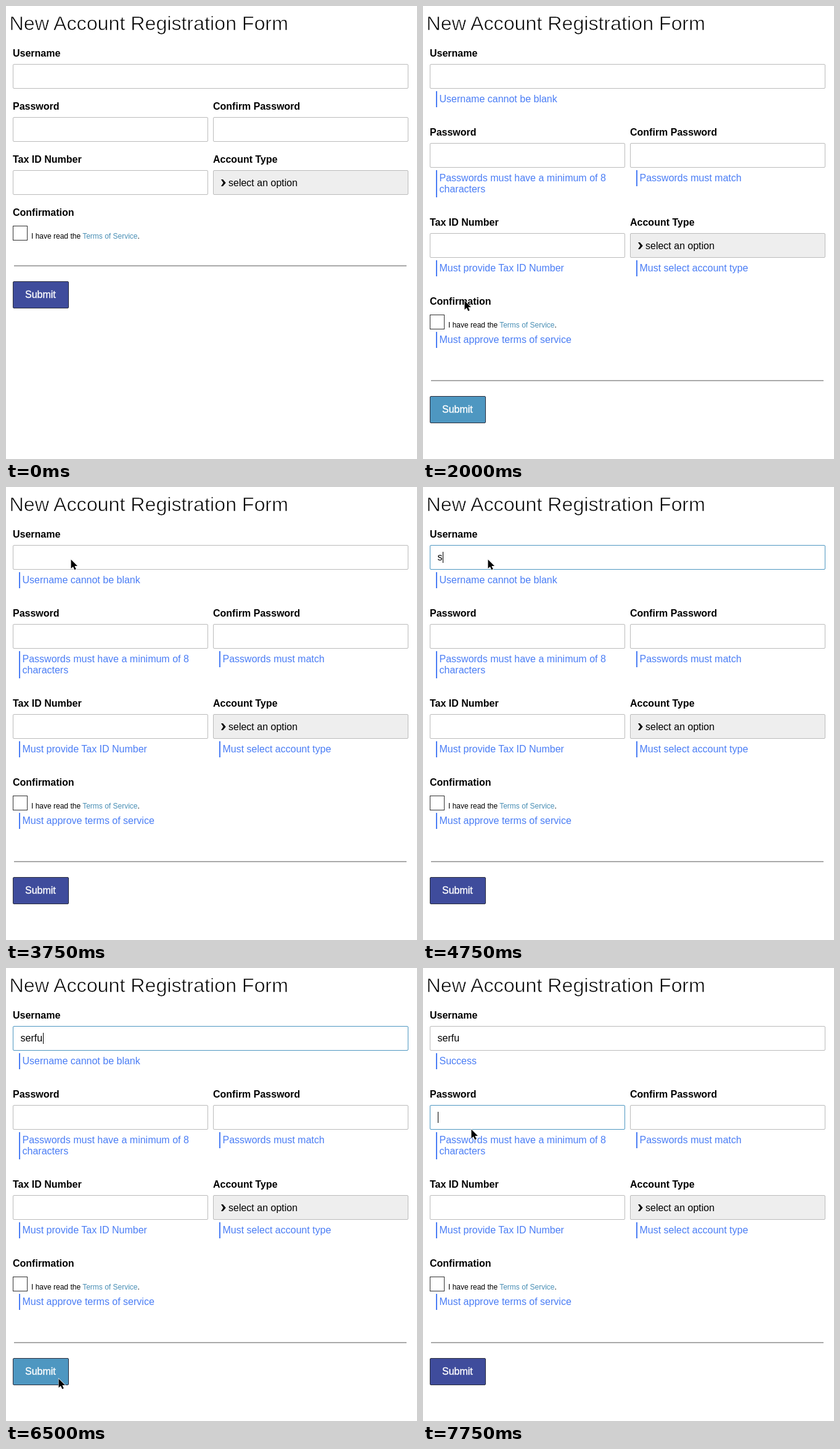
These frames come from a looping animation (667x734 px, 8 s). An HTML page:

```html
<!DOCTYPE html>
<html lang="en">
<head>
<meta charset="utf-8">
<title>Registration form</title>
<style>
  html, body { margin: 0; width: 100%; height: 100%; overflow: hidden; background: #fff; }
  svg { display: block; font: 16px "Liberation Sans", Arial, sans-serif; }
  .title { font-size: 32.2px; stroke: #fff; stroke-width: .75px; }
  .label { font-weight: bold; }
  .small { font-size: 12px; }
  .box { fill: #fff; stroke: #bbb; }
  .select { fill: #eee; }
  .focus { stroke: #4e97c1; }
  .errors { fill: #4a7df5; }
  .link { fill: #4a8fb5; }
  .button { fill: #3f4c9c; stroke: #2b2e3d; }
  .hover { fill: #4e97c1; }
  .caption { fill: #fff; stroke: #fff; stroke-width: .35px; }
</style>
</head>
<body>
<svg width="667" height="734" viewBox="0 0 667 734">
  <text class="title" x="5.5" y="39">New Account Registration Form</text>

  <text class="label" x="11" y="82">Username</text>
  <rect class="box" id="userBox" x="11.5" y="94.5" width="641" height="39" rx="1.5"/>
  <text id="userText" x="23.5" y="119"></text>

  <g data-shift="42">
    <text class="label" x="11" y="168">Password</text>
    <text class="label" x="336" y="168">Confirm Password</text>
    <rect class="box" id="passBox" x="11.5" y="180.5" width="316" height="39" rx="1.5"/>
    <rect class="box" x="336.5" y="180.5" width="316" height="39" rx="1.5"/>
  </g>

  <g data-shift="102">
    <text class="label" x="11" y="254">Tax ID Number</text>
    <text class="label" x="336" y="254">Account Type</text>
    <rect class="box" x="11.5" y="266.5" width="316" height="39" rx="1.5"/>
    <rect class="box select" x="336.5" y="266.5" width="316" height="39" rx="1.5"/>
    <path d="M349 281h3l4.7 5.5-4.7 5.5h-3l3.7-5.5z"/>
    <text x="361" y="292">select an option</text>
  </g>

  <g data-shift="144">
    <text class="label" x="11" y="340">Confirmation</text>
    <rect x="11.5" y="356.5" width="23" height="23" fill="#fff" stroke="#333"/>
    <text class="small" x="41" y="377">I have read the <tspan class="link">Terms of Service</tspan>.</text>
  </g>

  <g data-shift="186">
    <path d="M13 421H650" stroke="#aaa" stroke-width="2"/>
    <rect class="button" id="button" x="11.5" y="446.5" width="90" height="43" rx="1.5"/>
    <text class="caption" x="31" y="473">Submit</text>
  </g>

  <g class="errors" id="errors">
    <path d="M22 138v26M22 266v44M347 266v26M22 412v26M347 412v26M22 528v26" stroke="#4a7df5" stroke-width="2"/>
    <text id="userError" x="26.5" y="156"></text>
    <text x="26.5" y="284">Passwords must have a minimum of 8</text>
    <text x="26.5" y="302">characters</text>
    <text x="351.5" y="284">Passwords must match</text>
    <text x="26.5" y="430">Must provide Tax ID Number</text>
    <text x="351.5" y="430">Must select account type</text>
    <text x="26.5" y="546">Must approve terms of service</text>
  </g>

  <rect id="caret" y="105" width="1" height="18"/>
  <path id="cursor" d="M.5.5v14.6l3.4-3.2 2.4 5.3 2.4-1.1-2.4-5.1h4.7z" stroke="#fff" stroke-width="1.2" paint-order="stroke"/>
</svg>

<script>
const $ = id => document.getElementById(id);
const shifted = document.querySelectorAll('[data-shift]');
const name = 'serfu';

// Pointer tip: [time, x, y]
const path = [
  [250, 262, 115], [500, 244, 115], [1000, 225, 150], [1250, 160, 300], [1500, 78, 468],
  [1750, 70, 478], [2000, 67, 477], [2500, 75, 430], [2750, 100, 260], [3000, 130, 80],
  [3250, 138, 23], [3500, 109, 102], [3750, 105, 117], [6000, 104, 300], [6250, 95, 560],
  [6500, 85, 665], [7000, 84, 655], [7250, 80, 450], [7500, 79, 300], [7750, 78, 261]
];
const typing = [4750, 5000, 5250, 5500];
const lengths = [0, 1, 2, 4, 5];
const within = (t, from, to) => t >= from && t < to;
const show = (el, on) => el.setAttribute('visibility', on ? 'visible' : 'hidden');

function draw(t) {
  const failed = t >= 2000, accepted = t >= 6750;
  const userFocus = within(t, 4250, 6750), passFocus = t >= 7750;

  for (const g of shifted)
    g.setAttribute('transform', `translate(0 ${failed ? g.dataset.shift : 0})`);
  show($('errors'), failed);
  $('userError').textContent = accepted ? 'Success' : 'Username cannot be blank';
  $('userText').textContent = name.slice(0, lengths[typing.filter(k => k <= t).length]);

  $('userBox').classList.toggle('focus', userFocus);
  $('passBox').classList.toggle('focus', passFocus);
  $('button').classList.toggle('hover', within(t, 1500, 2500) || within(t, 6500, 7250));

  show($('caret'), userFocus || passFocus);
  $('caret').setAttribute('x', userFocus ? Math.round(24 + $('userText').getComputedTextLength()) : 24);
  $('caret').setAttribute('y', passFocus ? 233 : 105);

  const spot = path.filter(p => p[0] <= t).pop();
  show($('cursor'), spot);
  if (spot) $('cursor').setAttribute('transform', `translate(${spot[1]} ${spot[2]})`);
}

function tick() {
  draw(performance.now() % 8000);
  requestAnimationFrame(tick);
}
tick();
</script>
</body>
</html>
```
